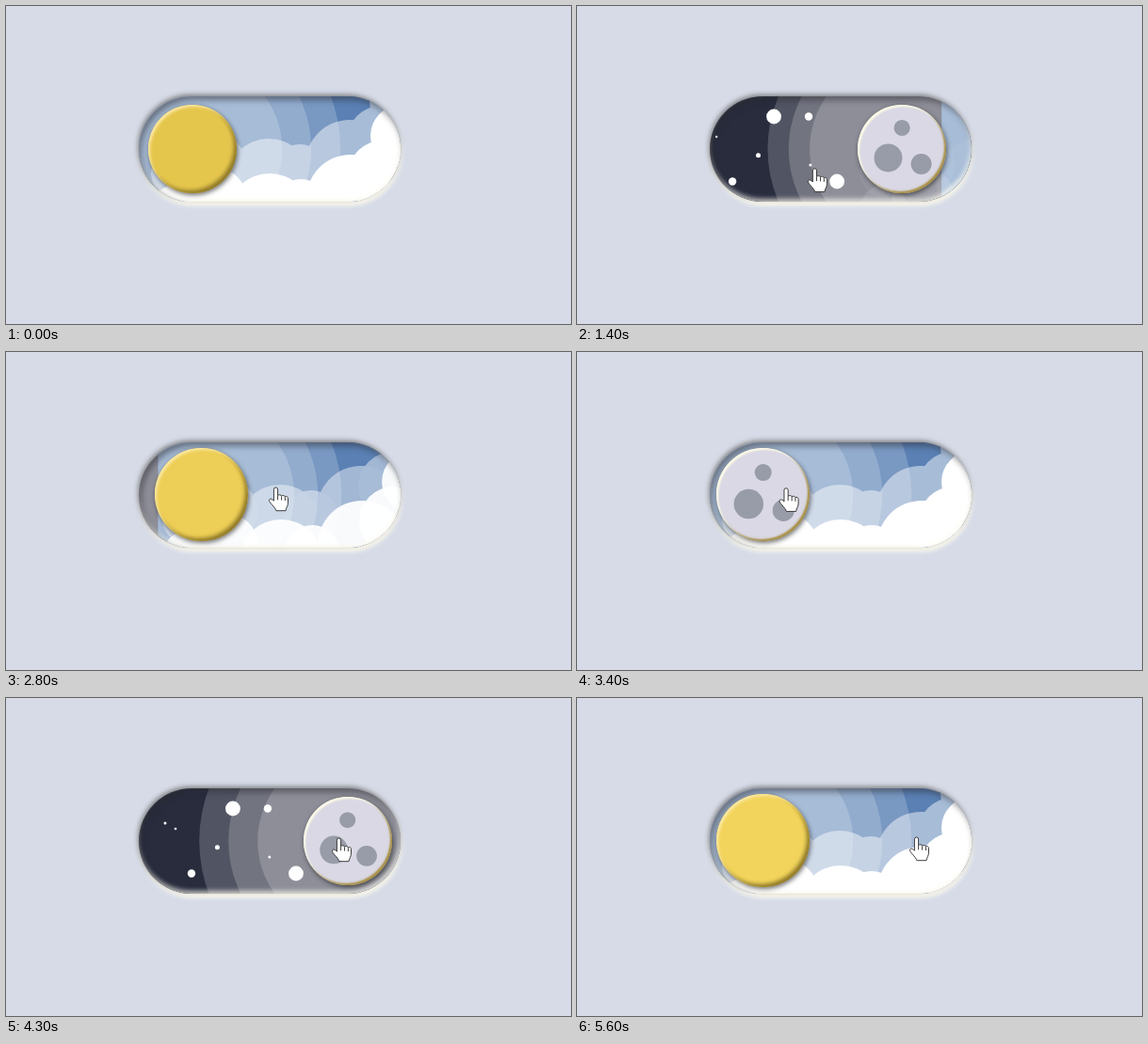
Animation of 600 by 338 pixels, one loop 5700 ms. Source, as an HTML page:

```html
<!DOCTYPE html>
<html lang="en">
<head>
<meta charset="utf-8">
<title>Day and night switch</title>
<style>
  html, body { margin: 0; width: 100%; height: 100%; overflow: hidden; background: #d6dbe7; }
  .pill, .rim, .knob, svg { position: absolute; left: 0; top: 0; }
  .pill, .rim { width: 278px; height: 112px; border-radius: 56px; }
  .pill {
    left: 141px; top: 96px; overflow: hidden;
    box-shadow: -1px -2px 5px rgba(70, 66, 64, .6), 1px 4px 5px #fffcee;
  }
  .rim { box-shadow: inset 3px 4px 6px rgba(40, 40, 46, .5), inset -1px -3px 5px rgba(255, 254, 246, .75); }
  .knob { border-radius: 50%; }
  .sun { box-shadow: 1px 2px 5px rgba(20, 20, 20, .6), inset 2px 2px 3px #fbe9a4, inset -3px -3px 4px #8d7727; }
  .moon {
    background: #d9d8e4;
    box-shadow: 1px 2px 5px rgba(20, 20, 20, .6), inset 2px 2px 2px #fdfae6, inset -2px -2px 2px #a58c3e;
  }
</style>
</head>
<body>
<div class="pill">
  <svg width="278" height="112" viewBox="141 96 278 112">
    <rect x="141" y="96" width="278" height="112" fill="#282c3d"/>
    <rect id="day" y="96" width="280" height="112" fill="#5a80b4"/>
    <g id="halos" fill="#fff" fill-opacity=".19"></g>
    <g id="stars" fill="#fff"></g>
    <g id="clouds" fill="#fff">
      <g id="back" opacity=".47" transform="translate(-1 -37)"></g>
      <g id="front"></g>
    </g>
  </svg>
  <div class="rim"></div>
</div>
<div class="knob" id="knob"></div>
<svg width="600" height="338">
  <g id="craters" fill="#979ca8"></g>
  <g id="cursor" fill="#fff" stroke="#333" stroke-linejoin="round">
    <path id="arrow" d="M0 0V16L3.8 12.6 6.4 18.6 8.9 17.5 6.3 11.6H11.4Z"/>
    <g id="hand" transform="translate(-.5) scale(.95)">
      <path d="M-2.2 2.2a2.2 2.2 0 0 1 4.4 0V9c1-1.2 4-1 4.2 .5 1.2-1 3.7-.6 4 .9 1.6-.8 3.3 0 3.3 1.8V17c0 4-2 5-2.6 9H.4C-1 21.5-8 16.5-7.4 14-6.800 12-4 12.5-2.2 15Z"/>
      <path d="M2.2 9v5M6.4 9.8v4.5M10.4 10.8v4" fill="none"/>
    </g>
  </g>
</svg>
<script>
const LOOP = 5700, STEP = 100, SLIDE = 500;
const WIDTH = 278, TRAVEL = 165, LEFT = 141, START = 197.7, MIDDLE = 152;
const CLICKS = [1018, 2395, 3400, 4750];
const ENTER = 700;

// x, y, radius; the same puffs make both cloud layers
const PUFFS = [[180, 215, 25], [222, 206, 34], [280, 222, 44], [313, 213, 29],
  [366, 205, 47], [400, 180, 37], [420, 138, 33]];
const CRATERS = [[0, -22.5, 8.6], [-14.7, 9.5, 15], [20.5, 16, 11]];
// time, x, y
const CURSOR_PATH = [[100, 384, 299], [600, 185, 226], [1100, 219, 181], [2100, 376, 143],
  [2800, 287, 144], [3700, 200, 145], [4300, 354, 149], [5600, 361, 148]];

const $ = id => document.getElementById(id);
const mix = (a, b, k) => a + (b - a) * k;
const smooth = k => k * k * (3 - 2 * k);

function addCircle(parent, cx, cy, r) {
  const el = document.createElementNS('http://www.w3.org/2000/svg', 'circle');
  for (const [key, value] of Object.entries({ cx, cy, r })) el.setAttribute(key, value);
  return parent.appendChild(el);
}

function addStars(parent) {
  for (let i = 0; i < 4; i++) {
    // Large stars form an arch, small ones a sagging chain.
    addCircle(parent, 197 + 37 * i + 8 * Math.sin(Math.PI * i / 3),
      140.5 + 46 * Math.cos(2 * Math.PI * i / 3), i % 2 ? 7.9 : 4.2);
    addCircle(parent, 169 + 55.4 * i, 133 + 36 * Math.sin(.8 * i), i % 2 ? 2.5 : 1.5);
  }
  addCircle(parent, 180, 139, 1.3);
}

addStars($('stars'));
const halos = [0, 1, 2].map(() => addCircle($('halos'), START, MIDDLE, 0));
CRATERS.forEach(c => addCircle($('craters'), ...c));
const puffs = ['back', 'front'].flatMap(id => PUFFS.map(c => addCircle($(id), ...c)));

// cubic-bezier(.42, 0, .58, 1)
function easeInOut(t) {
  let low = 0, high = 1;
  for (let i = 0; i < 24; i++) {
    const s = (low + high) / 2, q = 1 - s;
    if (1.26 * s * q * q + 1.74 * s * s * q + s ** 3 < t) low = s; else high = s;
  }
  return smooth(low);
}

// The knob runs slightly ahead of the scene at both ends.
const knobEase = t => easeInOut(t) + 1.7 * t * (1 - t) * (t - .6) ** 2;

function cursorAt(t) {
  const next = CURSOR_PATH.findIndex(([time]) => time >= t);
  const i = Math.max(1, next);
  const [t0, x0, y0] = CURSOR_PATH[i - 1], [t1, x1, y1] = CURSOR_PATH[i];
  const k = smooth(Math.min(1, Math.max(0, (t - t0) / (t1 - t0))));
  return [mix(x0, x1, k), mix(y0, y1, k)];
}

function drawScene(p) {
  const shift = TRAVEL * p, squeeze = 4 * p * (1 - p);
  $('day').setAttribute('x', LEFT + WIDTH * p);
  $('stars').setAttribute('transform', `translate(${-WIDTH * (1 - p)})`);
  $('clouds').setAttribute('transform', `translate(${shift})`);
  halos.forEach((halo, i) => {
    halo.setAttribute('cx', START + shift);
    halo.setAttribute('r', 95.5 + 3 * squeeze + i * 31 * (1 - .69 * squeeze));
  });
  puffs.forEach(puff => puff.setAttribute('opacity', 1 - p));
}

function drawKnob(p, night, hover) {
  const lift = hover ? 1 - p : 0, glow = lift ** 8;
  const x = START + TRAVEL * p, y = MIDDLE - .4 * lift, r = 46.9 + 2.7 * lift;
  const knob = $('knob');
  knob.className = 'knob ' + (night ? 'moon' : 'sun');
  Object.assign(knob.style, {
    left: x - r + 'px', top: y - r + 'px', width: 2 * r + 'px', height: 2 * r + 'px',
    background: night ? '' : `rgb(${mix(229, 242, glow)},${mix(198, 212, glow)},${mix(77, 92, glow)})`
  });
  $('craters').setAttribute('transform', `translate(${x} ${y}) scale(${r / 47.3})`);
  $('craters').style.display = night ? '' : 'none';
}

function drawCursor(t, hover) {
  $('cursor').style.display = t < CURSOR_PATH[0][0] ? 'none' : '';
  $('cursor').setAttribute('transform', `translate(${cursorAt(t).join(' ')})`);
  $('hand').style.display = hover ? '' : 'none';
  $('arrow').style.display = hover ? 'none' : '';
}

function render(t) {
  const count = CLICKS.filter(c => c <= t).length;
  const night = count % 2 === 1;
  const k = count ? Math.min(1, (t - CLICKS[count - 1]) / SLIDE) : 1;
  const toward = e => night ? e : 1 - e;
  const hover = t >= ENTER;
  drawScene(toward(easeInOut(k)));
  drawKnob(toward(knobEase(k)), night, hover);
  drawCursor(t, hover);
}

const begin = performance.now();
function tick() {
  const t = (performance.now() - begin) % LOOP;
  render(Math.floor(t / STEP) * STEP);
  requestAnimationFrame(tick);
}
tick();
</script>
</body>
</html>
```
